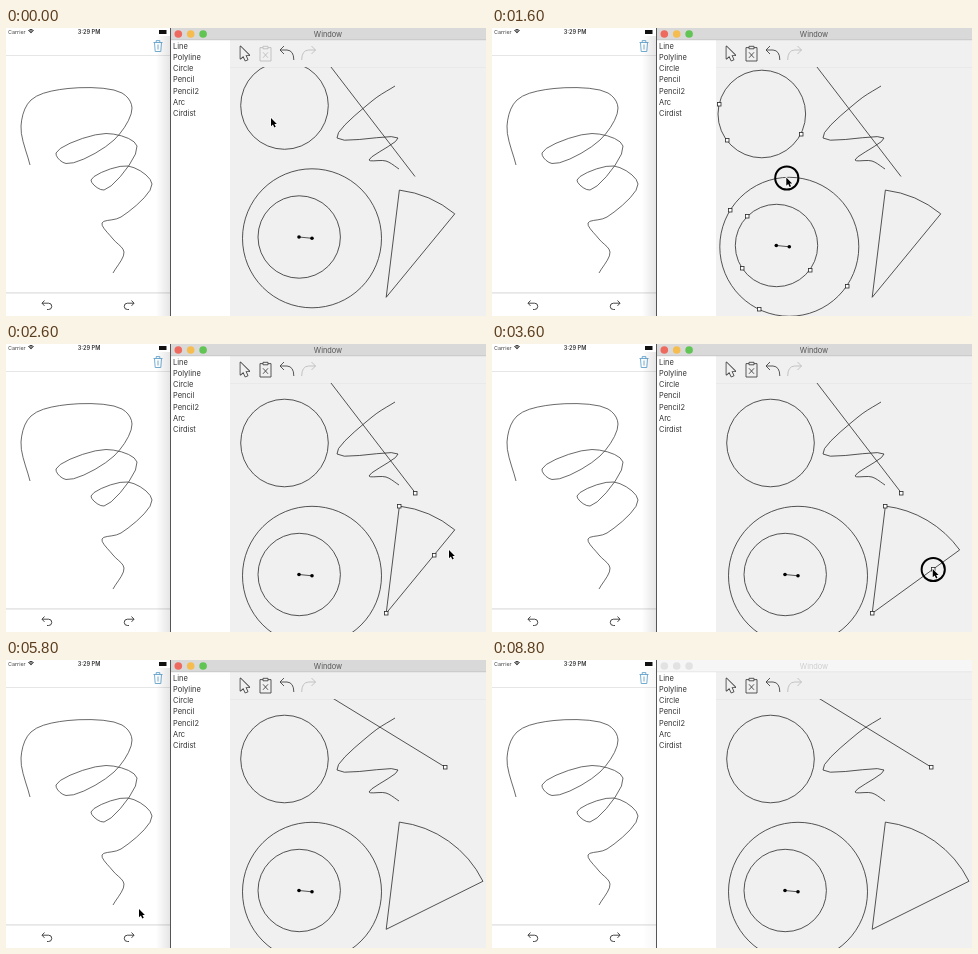
Animation, 480 px wide and 288 px high, one loop 9100 ms. Source, as an HTML page with a canvas:

```html
<!DOCTYPE html>
<html>
<head>
<meta charset="utf-8">
<style>
html, body { margin: 0; width: 100%; height: 100%; overflow: hidden; background: #fff }
canvas { display: block }
</style>
</head>
<body>
<canvas id="stage" width="480" height="288"></canvas>
<script>
const c = document.getElementById('stage').getContext('2d');
const LOOP = 9100, STEP = 100, INK = '#2a2a2a', GREY = '#bdbdbd', THIN = 0.8;

const mix = (a, b, u) => a.map((v, i) => v + (b[i] - v) * u);
const polar = (x, y, r, deg) => [x + r * Math.cos(deg * Math.PI / 180), y + r * Math.sin(deg * Math.PI / 180)];
const between = (t, a, b) => t >= a && t < b;
const ramp = (t, a, b) => Math.min(1, Math.max(0, (t - a) / (b - a)));
function ease(t, a, b) { const u = ramp(t, a, b); return u * u * (3 - 2 * u); }

// Centripetal Catmull-Rom curve through a few key points
function curve(text) {
  const key = text.split(' ').map(s => s.split(',').map(Number)), n = key.length;
  const p = [mix(key[0], key[1], -0.5), ...key, mix(key[n - 1], key[n - 2], -0.5)];
  const out = [key[0]];
  for (let i = 1; i < n; i++) {
    const q = p.slice(i - 1, i + 3), k = [0];
    for (let j = 1; j < 4; j++)
      k[j] = k[j - 1] + Math.sqrt(Math.hypot(q[j][0] - q[j - 1][0], q[j][1] - q[j - 1][1]));
    for (let s = 1; s <= 5; s++) {
      const t = k[1] + (k[2] - k[1]) * s / 5;
      const at = (a, b, from, to) => mix(a, b, (t - k[from]) / (k[to] - k[from]));
      const [a, b, d] = [0, 1, 2].map(j => at(q[j], q[j + 1], j, j + 1));
      out.push(at(at(a, b, 0, 2), at(b, d, 1, 3), 1, 2));
    }
  }
  return out;
}

const doodle = curve('24,137 15,98 25,72 62,60.5 116,65 126,80 108,112 60,135.5 50,125 100,105.5 131,118 98,162 85,152 ' +
  '122,138 146,156 115,189 96,195 107,211 118,224 107,245');
const scribble = curve('109,55 80,82 57,113 62,134 114,122 63,150 73,167 115,165 91,193 120,200 81,222 118,229 94,248 115,252');
const squiggle = curve('389,58 366,73 331,110 392,110 363,132 380,133 393,141');

// Everything that moves, at time t
function scene(t) {
  const u = ease(t, 1200, 2000);
  const shift = [-8.7 * Math.sin(Math.PI * u), 21.5 * u ** 1.34];
  const arcEnd = -50.6 + 24.2 * ease(t, 3200, 3900);
  const arcGrip = polar(380, 269, 75, arcEnd);
  const lineEnd = mix([409, 148.5], [439, 107], ease(t, 4600, 5000));
  const drawn = scribble.slice(0, Math.max(1, Math.ceil(ramp(t, 6000, 6900) * scribble.length)));

  // Pointer trips: leave, arrive, place (places being dragged carry it along)
  const trips = [
    [0, 300, [272, 121]],
    [500, 800, [303 + shift[0], 141 + shift[1]]],
    [2100, 2300, lineEnd],
    [2400, 2600, [443, 206]],
    [2700, 3000, arcGrip],
    [4000, 4500, lineEnd],
    [5200, 5800, [133, 249]],
    [5800, 6000, drawn[drawn.length - 1]],
    [6900, 7200, [50, 274]]
  ];
  const pointer = trips.reduce((p, [a, b, to]) => mix(p, to, ease(t, a, b)), [265, 90]);
  return { shift, arcEnd, arcGrip, lineEnd, drawn, pointer };
}
const presses = [[300, 500], [800, 900], [1100, 2100], [2300, 2400], [3100, 4000], [4700, 5100], [6000, 7000], [7400, 7600]];

function rect(x, y, w, h, fill) { c.fillStyle = fill; c.fillRect(x, y, w, h); }

function stroke(shape, color = INK, width = THIN) {
  c.strokeStyle = color; c.lineWidth = width; c.stroke(shape);
}

function line(pts, width = THIN) {
  const p = new Path2D();
  pts.forEach(q => p.lineTo(...q));
  stroke(p, INK, width);
}

function disc(x, y, r) { const p = new Path2D(); p.arc(x, y, r, 0, 7); return p; }
function dot(x, y, r, fill) { c.fillStyle = fill; c.fill(disc(x, y, r)); }

function handle([x, y]) {
  const hx = Math.round(x) - 1.5, hy = Math.round(y) - 1.5;
  rect(hx, hy, 3.5, 3.5, '#fff');
  c.strokeStyle = INK; c.lineWidth = THIN; c.strokeRect(hx, hy, 3.5, 3.5);
}

// A circle, with handles at the given angles
function ring(x, y, r, angles) {
  stroke(disc(x, y, r));
  angles.forEach(a => handle(polar(x, y, r, a)));
}

function label(text, x, y, size, color, align = 'left', weight = 400) {
  c.font = `${weight} ${size}px Inter, Roboto, sans-serif`;
  c.textAlign = align; c.fillStyle = color; c.fillText(text, x, y);
}

function icon(d, x, y, color, flip = 1) {
  c.save();
  c.translate(x, y); c.scale(flip, 1);
  stroke(new Path2D(d), color, 0.9);
  c.restore();
}
const HOOK = 'M-2.5 -5L-5 -2.3L-2.5 .4M-5 -2.3H1.6A3.1 3.1 0 0 1 1.6 4H0';
const BEND = 'M-3 -7.5L-7 -3.5L-3 .5M-7 -3.5H0Q6.8 -3 6.8 6.5';
const TRASH = 'M-4.5 -3.5H4.5M-1.8 -3.5V-5.4H1.8V-3.5M-3.5 -3.5L-2.8 5.5H2.8L3.5 -3.5M0 -1.5V3.5';
const CLIPBOARD = 'M-2.5 -6.2H-5.5V7.2H5.5V-6.2H2.5M-2.5 -7.5H2.5V-5H-2.5ZM-2.5 -1.5L2.5 4M2.5 -1.5L-2.5 4';

function arrow([x, y], size, fill, edge, width) {
  c.save();
  c.translate(x, y); c.scale(size, size);
  c.lineJoin = 'round';
  const p = new Path2D('M0 0V8.6L2 6.8L3.5 10L5 9.3L3.6 6.2H6.2Z');
  stroke(p, edge, width);
  c.fillStyle = fill; c.fill(p);
  c.restore();
}

function phone(t, s, active) {
  rect(0, 0, 164, 288, '#fff');
  rect(0, 27, 164, 0.7, '#dcdcdc');
  rect(0, 264.6, 164, 0.7, '#c4c4c4');
  label('Carrier', 2, 6, 5.4, '#444');
  label('3:29 PM', 83, 6, 5.6, '#333', 'center', 600);
  for (const r of [1.2, 2.6, 4]) {
    const p = new Path2D();
    p.arc(25, 5.6, r, -2.3, -0.84);
    stroke(p, '#222', 1);
  }
  rect(153, 2, 7.5, 4, '#111');
  icon(TRASH, 152, 18, '#64a3cc');

  line(doodle, 0.7);
  if (between(t, 6000, 7500)) line(s.drawn, 0.7);
  icon(HOOK, 41, 277.5, '#333');
  icon(HOOK, 123, 277.5, between(t, 6900, 7500) ? GREY : '#333', -1);

  const g = c.createLinearGradient(150, 0, 164, 0);
  g.addColorStop(0, 'rgba(0,0,0,0)');
  g.addColorStop(1, `rgba(0,0,0,${active ? 0.1 : 0.03})`);
  rect(150, 8, 14, 280, g);
}

function drawing(t, s) {
  const [dx, dy] = s.shift;
  const first = between(t, 400, 2200), second = between(t, 900, 2200);
  c.save();
  c.beginPath(); c.rect(224, 39, 256, 249); c.clip();
  ring(278.5 + dx, 77.5 + dy, 43.8, first ? [193, 27, 143] : []);
  ring(306 + dx, 210.3 + dy, 69.5, second ? [212, 34, 116] : []);
  ring(293.2 + dx, 209 + dy, 41.2, second ? [225, 36, 147] : []);
  const hubs = [[293 + dx, 209 + dy], [306 + dx, 210.3 + dy]];
  line(hubs);
  hubs.forEach(h => dot(...h, 1.8, '#000'));

  line(squiggle);
  line([[322.3, 35.5], s.lineEnd]);
  if (t >= 2300) handle(s.lineEnd);

  const tip = [380.2, 269.3], sector = new Path2D();
  sector.moveTo(...tip);
  sector.arc(...tip, 108, -83 * Math.PI / 180, s.arcEnd * Math.PI / 180);
  sector.closePath();
  stroke(sector);
  if (between(t, 2500, 4200)) [tip, polar(...tip, 108, -83), s.arcGrip].forEach(handle);
  c.restore();
}

function app(t, s, active) {
  rect(164, 0, 316, 288, '#f0f0f0');
  rect(165, 12, 59, 276, '#fff');
  rect(164, 0, 316, 12, active ? '#d9d9d9' : '#f6f6f6');
  rect(164, 11.5, 316, 0.7, active ? '#c0c0c0' : '#e2e2e2');
  rect(224, 39, 256, 0.6, '#e4e4e4');
  rect(164, 0, 1, 288, '#555');
  ['#ee6a5f', '#f5bd4f', '#61c454'].forEach((f, i) => dot(172.3 + 12.4 * i, 6, 3.8, active ? f : '#e2e2e2'));
  label('Window', 322, 9, 7.4, active ? '#555' : '#cecece', 'center');
  ['Line', 'Polyline', 'Circle', 'Pencil', 'Pencil2', 'Arc', 'Cirdist']
    .forEach((name, i) => label(name, 167, 20.7 + 11.25 * i, 7.5, '#333'));

  arrow([234.5, 18.5], 1.4, '#f0f0f0', '#444', 1.2);
  icon(CLIPBOARD, 259.5, 25.8, t >= 400 ? '#444' : GREY);
  icon(BEND, 281, 25.5, '#444');
  icon(BEND, 302.5, 25.5, GREY, -1);
  drawing(t, s);
}

function draw(t) {
  const s = scene(t), active = t < 6000;
  phone(t, s, active);
  app(t, s, active);
  if (t >= 8000) return;
  const [x, y] = s.pointer;
  if (presses.some(([a, b]) => between(t, a, b))) stroke(disc(x + 0.5, y + 0.5, 11.6), '#000', 2);
  arrow(s.pointer, 0.95, '#000', '#fff', 1.4);
}

function tick(now) {
  draw(Math.floor(now % LOOP / STEP) * STEP);
  requestAnimationFrame(tick);
}
draw(0);
requestAnimationFrame(tick);
</script>
</body>
</html>
```
